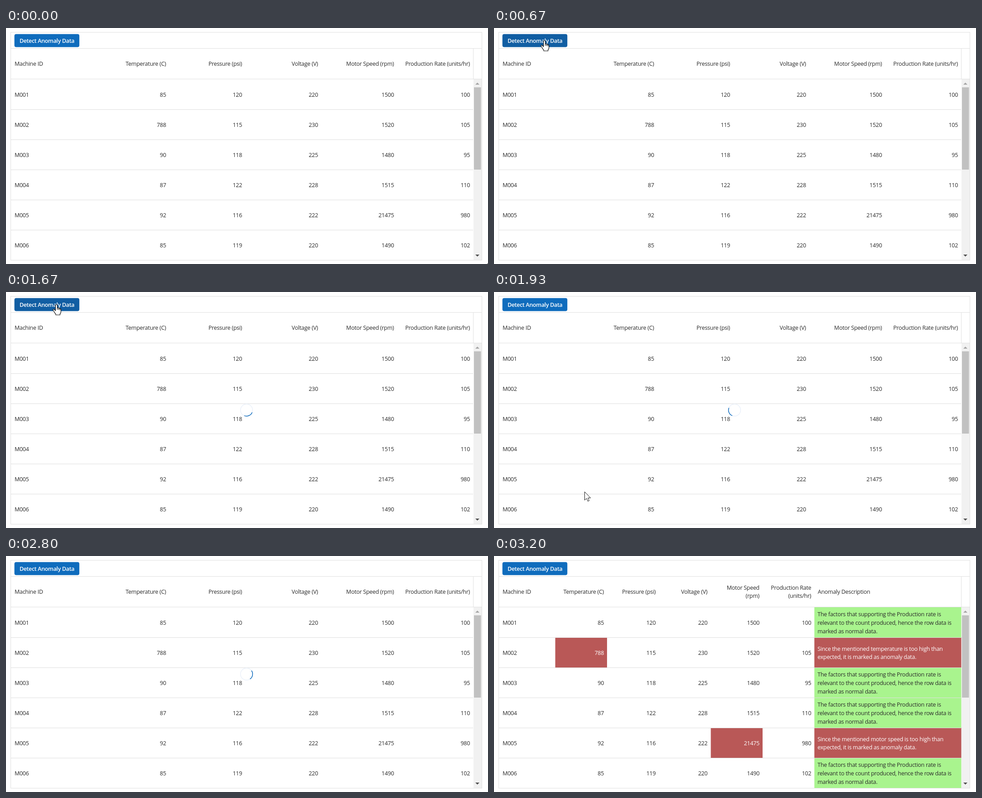
Recreate the animation shown at these times as an HTML page with a canvas. Size 1066 px wide and 525 px high, loop 4.87 s.

```html
<!DOCTYPE html>
<html lang="en">
<head>
<meta charset="utf-8">
<title>Anomaly detection grid</title>
<style>
  html, body { margin: 0; width: 100%; height: 100%; overflow: hidden; background: #fff; }
  canvas { display: block; }
</style>
</head>
<body>
<canvas id="stage" width="1066" height="525"></canvas>
<script>
const ctx = document.getElementById('stage').getContext('2d');
const LOOP = 4870, STEP = 200 / 3;
const ROW_TOP = 114, ROW_HEIGHT = 67, LINE_HEIGHT = 18.6;
const INK = '#2b2b2b', RULE = '#e0e0e0', GREEN = '#a9f48e', RED = '#b95857';
const FONT = '"Open Sans", "Noto Sans", sans-serif';

const rows = [
  ['M001', 85, 120, 220, 1500, 100],
  ['M002', 788, 115, 230, 1520, 105],
  ['M003', 90, 118, 225, 1480, 95],
  ['M004', 87, 122, 228, 1515, 110],
  ['M005', 92, 116, 222, 21475, 980],
  ['M006', 85, 119, 220, 1490, 102]
];
const wideView = {
  rights: [354, 522, 690, 858, 1026],
  heads: ['Temperature (C)', 'Pressure (psi)', 'Voltage (V)', 'Motor Speed (rpm)', 'Production Rate (units/hr)']
};
const resultView = {
  rights: [243, 357.5, 472, 587, 701.5],
  heads: ['Temperature (C)', 'Pressure (psi)', 'Voltage (V)', 'Motor Speed\n(rpm)', 'Production Rate\n(units/hr)'],
  anomalies: { 1: { col: 1, name: 'temperature' }, 4: { col: 4, name: 'motor speed' } }
};
const normalText = 'The factors that supporting the Production rate is\n' +
  'relevant to the count produced, hence the row data is\nmarked as normal data.';
const anomalyText = name =>
  `Since the mentioned ${name} is too high than\nexpected, it is marked as anomaly data.`;

const mix = (a, b, u) => a + (b - a) * u;
const easeOut = u => 1 - (1 - u) ** 2;

function rect(x, y, w, h, color) {
  ctx.fillStyle = color;
  ctx.fillRect(x, y, w, h);
}

function setFont(weight, spacing) {
  ctx.font = `${weight} 12.5px ${FONT}`;
  ctx.letterSpacing = spacing;
}

function label(text, x, baseline, align = 'left', color = INK) {
  ctx.fillStyle = color;
  ctx.textAlign = align;
  const lines = String(text).split('\n');
  lines.forEach((line, i) => {
    const shift = (i - (lines.length - 1) / 2) * LINE_HEIGHT;
    ctx.fillText(line, x, Math.round(baseline + shift));
  });
}

function shape(points, fill) {
  ctx.beginPath();
  points.forEach(([x, y]) => ctx.lineTo(x, y));
  ctx.closePath();
  ctx.fillStyle = fill;
  ctx.fill();
}

function drawButton(color) {
  ctx.beginPath();
  ctx.roundRect(18.6, 13.4, 143.6, 29.2, 4);
  ctx.fillStyle = color;
  ctx.fill();
  setFont(600, '-0.35px');
  label('Detect Anomaly Data', 90.5, 33, 'center', '#fff');
}

function drawScrollbar() {
  rect(1034, 114, 18, 402, '#f1f1f1');
  rect(1035, 132, 15.5, 183, '#c1c1c1');
  shape([[1038, 126], [1042.5, 121.5], [1047, 126]], '#a3a3a3');
  shape([[1038, 504], [1047, 504], [1042.5, 508.5]], '#505050');
}

function drawTable(view) {
  const { rights, heads, anomalies } = view;
  setFont(400, '-0.28px');
  label('Machine ID', 19, 84);
  heads.forEach((head, i) => label(head, rights[i], 84, 'right'));
  if (anomalies) label('Anomaly Description', 716, 84);

  rows.forEach((row, r) => {
    const top = ROW_TOP + r * ROW_HEIGHT, baseline = top + 39;
    const anomaly = anomalies && anomalies[r];
    if (anomalies) rect(708.5, top, 325, ROW_HEIGHT, anomaly ? RED : GREEN);
    if (anomaly) rect(rights[anomaly.col - 1] - 107.5, top, 114.5, ROW_HEIGHT, RED);
    if (r) rect(11, top, 1022, 1, '#dedede');
    row.forEach((value, c) => {
      const color = anomaly && anomaly.col === c ? '#fff' : INK;
      if (c) label(value, rights[c - 1], baseline, 'right', color);
      else label(value, 19, baseline);
    });
    if (anomaly) label(anomalyText(anomaly.name), 715.5, baseline, 'left', '#fff');
    else if (anomalies) label(normalText, 715.5, baseline);
  });
}

function drawFrame() {
  rect(11, 45, 1041, 1, RULE);
  rect(11, 113, 1041, 1, RULE);
  rect(1033, 46, 1, 67, RULE);
  drawScrollbar();
  ctx.strokeStyle = RULE;
  ctx.lineWidth = 1;
  ctx.strokeRect(10.5, 9.5, 1042, 507);
}

// Angle of the arc's middle, in degrees, at each step.
const spin = [[18, -90], [29, 157], [36, 262], [47, 460]];

function drawSpinner(step) {
  const i = Math.max(1, spin.findIndex(([s]) => s >= step));
  const [[s0, a0], [s1, a1]] = [spin[i - 1], spin[i]];
  const middle = mix(a0, a1, (step - s0) / (s1 - s0)) * Math.PI / 180;
  const arc = (from, to, color) => {
    ctx.beginPath();
    ctx.arc(532, 262.7, 13.4, from, to);
    ctx.strokeStyle = color;
    ctx.lineWidth = 1.5;
    ctx.stroke();
  };
  arc(0, Math.PI * 2, '#ebf1fa');
  arc(middle - Math.PI / 4, middle + Math.PI / 4, '#0f6cbd');
}

// Pointer moves: first step, last step, start and end point.
const moves = [
  { from: 0, to: 3, a: [1065, 523], b: [488, 179], ease: easeOut },
  { from: 5, to: 10, a: [488, 179], b: [111, 28], ease: easeOut },
  { from: 25, to: 29, a: [111, 28], b: [200, 444], ease: u => u },
  { from: 29, to: 33, a: [200, 444], b: [150, 514], ease: u => u }
];

function pointerAt(step) {
  if (step > 33) return null;
  const move = moves.filter(m => m.from <= step).pop();
  const u = move.ease(Math.min(1, (step - move.from) / (move.to - move.from)));
  return [0, 1].map(i => Math.round(mix(move.a[i], move.b[i], u)));
}

const arrow = new Path2D('M0 0V18.5L4.3 14.6L7 21L10 19.7L7.3 13.6H13Z');
const hand = new Path2D(
  'M-2 1.5Q-2 -.5 0 -.5Q2 -.5 2 1.5V7Q4.7 5.8 5 8Q7.4 6.8 7.8 9' +
  'Q10 8.2 10 10.6V15.5Q10 18 8 20V22.5H-1.5V20.5Q-4 18 -5.5 14.5L-7.6 11.8' +
  'Q-7.8 9.4 -5.4 9.8L-2 13Z');
const knuckles = new Path2D('M2 7V11M5 8V11.5M7.8 9V12');

function drawPointer([x, y], isHand) {
  ctx.save();
  ctx.translate(x + .5, y + .5);
  ctx.lineWidth = isHand ? 1.2 : 1;
  ctx.lineJoin = 'round';
  ctx.fillStyle = '#fff';
  ctx.strokeStyle = '#111';
  const outline = isHand ? hand : arrow;
  ctx.fill(outline);
  ctx.stroke(outline);
  if (isHand) ctx.stroke(knuckles);
  ctx.restore();
}

function render(time) {
  const step = Math.floor((time + 5) / STEP);
  const pointer = pointerAt(step);
  const hover = pointer && pointer[0] < 163 && pointer[1] < 43;
  const pressed = step >= 15 && step < 18;

  rect(0, 0, 1066, 525, '#fff');
  drawTable(step < 48 ? wideView : resultView);
  drawFrame();
  drawButton(pressed ? '#0c3b5e' : hover ? '#115ea3' : '#0f6cbd');
  if (step >= 18 && step < 48) drawSpinner(step);
  if (pointer) drawPointer(pointer, hover);
}

const start = performance.now();
function tick() {
  render((performance.now() - start) % LOOP);
  requestAnimationFrame(tick);
}
tick();
</script>
</body>
</html>
```
